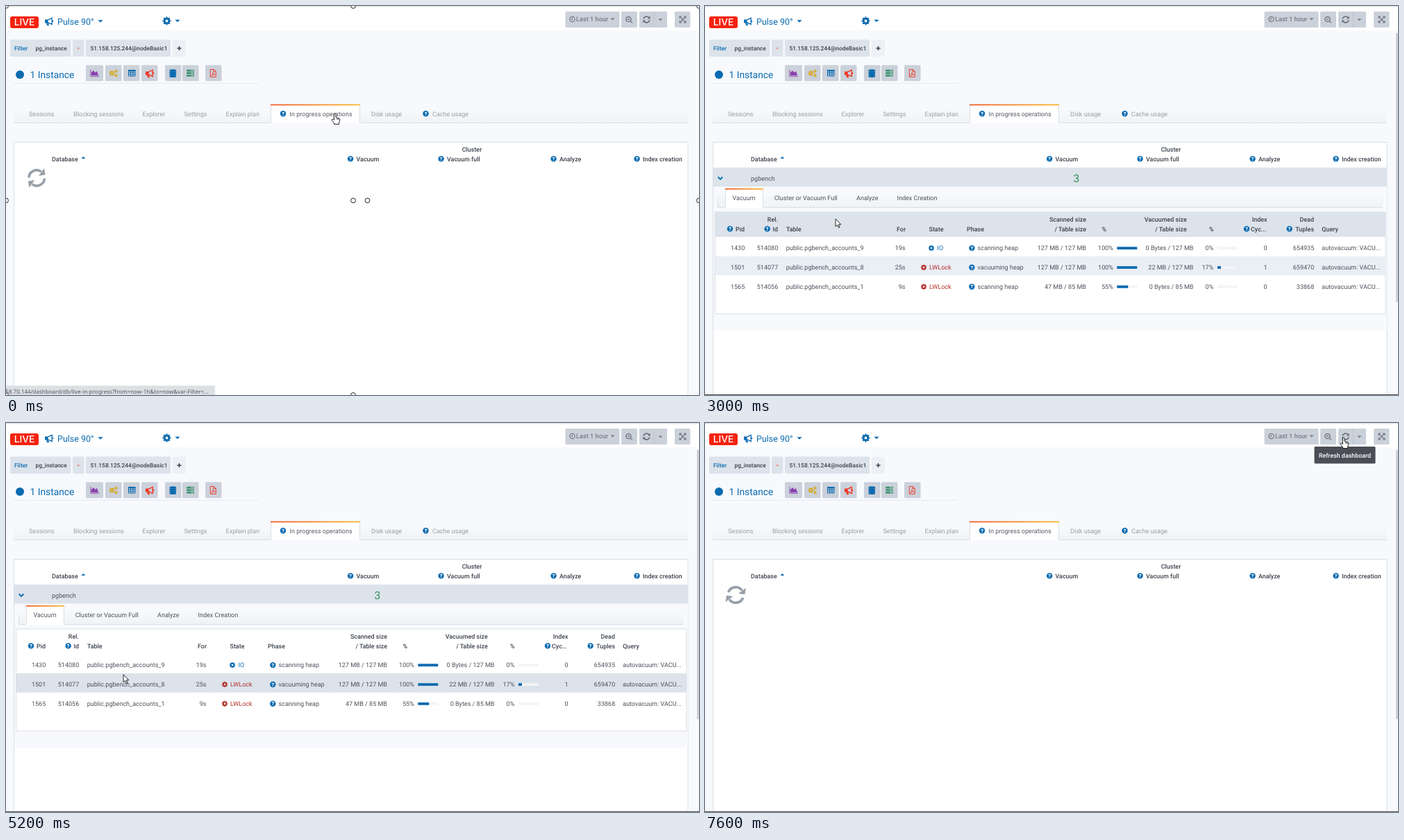
These frames come from a looping animation (998 px wide and 561 px high, 7800 ms). An HTML page:

```html
<!DOCTYPE html>
<html lang="en">
<head>
<meta charset="utf-8">
<title>In progress operations</title>
<style>
html, body { margin: 0; width: 100%; height: 100%; overflow: hidden; background: #f7f9fc; }
svg { display: block; width: 998px; height: 561px; text-rendering: geometricPrecision; }
text { font-family: Roboto, Arial, sans-serif; white-space: pre; }
</style>
</head>
<body>
<svg id="stage" viewBox="0 0 998 561" xmlns="http://www.w3.org/2000/svg"></svg>
<script>
const BLUE = '#0b6bb0', INK = '#3b424c', BODY = '#4b525c', MUTED = '#9a9da3', RED = '#b5312c';
const HOVER = '#dce3eb', LINE = '#dadee4';
const STEP = 200, LOOP = 7800;

// y is the vertical middle of the capitals
const text = (x, y, s, { size = 9.05, fill = BODY, weight = 400, anchor = 'start', font = '' } = {}) =>
  `<text x="${x}" y="${y + size * .356}" font-size="${size}" fill="${fill}" font-weight="${weight}" text-anchor="${anchor}"${font && ` style="font-family:${font}"`}>${s.replace(/&/g, '&amp;')}</text>`;
const rect = (x, y, w, h, fill, extra = '') => `<rect x="${x}" y="${y}" width="${w}" height="${h}" fill="${fill}" ${extra}/>`;
const path = (d, fill, extra = '') => `<path d="${d}" fill="${fill}" ${extra}/>`;
const line = (d, stroke, w = 1, extra = '') => path(d, 'none', `stroke="${stroke}" stroke-width="${w}" ${extra}`);
const at = (x, y, body, scale = 1) => `<g transform="translate(${x} ${y}) scale(${scale})">${body}</g>`;
const group = (id, body) => `<g id="${id}">${body}</g>`;
const head = (x, y, s, anchor) => text(x, y, s, { size: 8.95, fill: INK, weight: 500, anchor });
const right = (x, y, s) => text(x, y, s, { anchor: 'end' });

const help = (x, y) => `<circle cx="${x}" cy="${y}" r="4.2" fill="${BLUE}"/>` +
  text(x, y, '?', { size: 7.2, fill: '#fff', weight: 900, anchor: 'middle' });
const gear = (x, y, r, fill) =>
  `<g fill="none" stroke="${fill}"><circle cx="${x}" cy="${y}" r="${r * .56}" stroke-width="${r * .48}"/>
  <circle cx="${x}" cy="${y}" r="${r * .86}" stroke-width="${r * .3}" pathLength="16" stroke-dasharray="1 1" stroke-dashoffset=".5"/></g>`;
const caret = (x, y, fill, r = 3.6) => path(`M${x - r} ${y - r / 2}h${2 * r}l${-r} ${r}z`, fill);
const bullhorn = (x, y, fill) => at(x, y,
  line('M-5.2-1.8H-1.5L4.2-4.6V4.4L-1.5 1.8H-5.2zM-3.5 2l1.2 3.6h1.6L-1.8 2M5.5-1.2V1', fill, 1.3) +
  path('M-5.5-2H-1.5V2H-5.5z', fill));
const arrows = (fill, w = 3.6) => {
  const half = line('M-11-2.5A11.2 11.2 0 0 1 8-7.8', fill, w) + path('M13-12V-2.5H3.5z', fill);
  return half + `<g transform="rotate(180)">${half}</g>`;
};
const button = (x, y, w, h = 23) => rect(x, y, w, h, '#cbd1da', 'rx="1.5"');
const tag = (x, w) => rect(x, 48.5, w, 24.5, '#dce3eb', 'rx="1.5"');

function header() {
  const grey = '#737b87', bold = { size: 8.4, fill: INK, weight: 500 };
  let s = rect(0, 0, 998, 35, '#fff') + rect(0, 0, 998, 1.5, '#e4e6e8');
  s += rect(6, 15, 41, 17, '#f4230f', 'rx="3"') +
    text(26.5, 23.3, 'LIVE', { size: 13.8, fill: '#fff', weight: 500, anchor: 'middle', font: 'Inter, sans-serif' });
  s += bullhorn(62, 22, BLUE) + text(74, 22.2, 'Pulse 90°', { size: 12.5, fill: BLUE }) + caret(136, 22, BLUE);
  s += gear(231.5, 21.5, 6, BLUE) + caret(247, 21.5, BLUE);

  s += button(805.5, 8, 78) + button(886, 8, 23) + button(912, 8, 40) + button(963, 8, 22.5);
  s += `<circle cx="815.5" cy="19" r="3.6" fill="none" stroke="${grey}" stroke-width="1.2"/>` + line('M815.5 17v2.3h-2', grey) +
    text(821, 19.2, 'Last 1 hour', { size: 9.2, fill: grey, weight: 500 }) + caret(873.5, 19, grey, 3);
  s += `<circle cx="896.5" cy="19" r="3.6" fill="none" stroke="${grey}" stroke-width="1.5"/>` +
    line('M899 21.5l3 3M894.8 19h3.4', grey, 1.3);
  s += at(922.5, 19.5, arrows('#5f6874', 4), .4) + line('M933 8v23', '#bcc3cd') + caret(942.5, 20, grey, 3);
  s += line('M970.5 15.5l8 8M978.5 15.5l-8 8', grey, 1.3) +
    path('M969.5 14.5h4l-4 4zM979.5 14.5v4l-4-4zM969.5 24.5v-4l4 4zM979.5 24.5h-4l4-4z', grey);

  s += tag(6, 87.5) + tag(96, 16.5) + tag(115, 122) +
    rect(240, 49, 19, 24, '#edf0f4', 'rx="1.5"');
  s += text(12, 61, 'Filter', { ...bold, fill: BLUE }) + text(42.5, 61, 'pg_instance', bold) +
    text(104.3, 61, '=', { size: 6, fill: '#f06050', weight: 700, anchor: 'middle' }) +
    text(121.5, 61, '51.158.125.244@nodeBasic1', bold) + line('M246.5 61h6M249.5 58v6', INK, 1.6);

  s += `<circle cx="20" cy="99" r="6" fill="${BLUE}"/>` + text(34.5, 99.3, '1 Instance', { size: 13.8, fill: BLUE });
  s += line('M11 111.5H364', '#e6eaef');
  return s;
}

function toolbar() {
  let s = [115, 143, 169, 195, 229, 254, 287].map((x, i) => button(x, 85.3, i ? 23.5 : 25)).join('');
  s += path('M123 100v-4l3-3 2.5 3 2.5-2 2 6z', '#8a3fae') + line('M122 92v9.3h12', '#8a3fae');
  s += gear(152.5, 97, 3.8, '#d9a514') + gear(158.5, 93.8, 2.4, '#d9a514') + gear(158.5, 100.2, 2.4, '#d9a514');
  s += line('M176.5 92.5h9.5v8.5h-9.5zM176.5 95.5h9.5M176.5 98.2h9.5M179.7 93v8M182.9 93v8', BLUE) + rect(176, 92, 10.5, 2, BLUE);
  s += bullhorn(207, 97, '#f0301c');
  for (let i = 0; i < 4; i++)
    s += `<ellipse cx="240.3" cy="${92.8 + i * 2.9}" rx="4.8" ry="1.5" fill="${BLUE}"/>`;
  s += rect(235.5, 93, 9.6, 8.2, BLUE, 'opacity=".65"');
  for (let i = 0; i < 3; i++)
    s += rect(260.2, 91.8 + i * 3.6, 10.6, 2.7, '#3c9070') + rect(266.5, 92.7 + i * 3.6, 3, .9, '#dceae4');
  s += line('M294.3 91.5h5l3 3v7.8h-8zM299 91.7v3h3', '#ee3a2e') + line('M296 100.5q2-2 2.2-5q.4 4 3 3.4q-2.6-.6-5.2 1.6', '#ee3a2e', .8);
  return s;
}

function panel() {
  let s = rect(11, 141, 971, 27.5, 'url(#strip)') + line('M11 168.5H982', LINE);
  s += rect(381, 142, 129, 27, '#fff') + line('M381.5 143V168.5M509.5 143V168.5', LINE) + rect(381, 141.6, 129, 1.8, 'url(#accent)');
  const tabs = [[33, 'Sessions'], [97, 'Blocking sessions'], [196.5, 'Explorer'], [256.5, 'Settings'],
    [316.5, 'Explain plan'], [526, 'Disk usage'], [614, 'Cache usage']];
  for (const [x, name] of tabs) s += text(x, 155.3, name, { fill: MUTED });
  s += text(408.5, 155.3, 'In progress operations', { fill: '#555b64' }) + help(399, 155.3) + help(604.5, 155.3);
  s += rect(11.5, 196.5, 970.5, 380, '#fff', `stroke="${LINE}"`);
  s += group('dbHover', rect(12, 233, 970, 27.5, HOVER));
  s += head(66, 220.4, 'Database') + path('M108.5 220h5.8l-2.9-3z', BLUE) + head(671, 206.8, 'Cluster', 'middle');
  for (const [x, name] of [[504.5, 'Vacuum'], [635, 'Vacuum full'], [797, 'Analyze'], [917, 'Index creation']])
    s += help(x - 8.4, 220.4) + head(x, 220.4, name);
  return s;
}

function row(y, [pid, rel, table, age, state, phase, scanned, done, vacuumed, cleaned, cycles, dead]) {
  const io = state === 'IO', fill = io ? BLUE : RED;
  const bar = (x, pct) => rect(x, y - 1.8, 29, 3.8, '#f3f4f6') + rect(x, y - 1.8, 29 * pct / 100, 3.8, BLUE);
  return right(57.3, y, pid) + right(105.3, y, rel) + text(116.7, y, 'public.pgbench_accounts_' + table) +
    right(288.5, y, age) + gear(io ? 326 : 315, y, 4.2, fill) + text(io ? 334.5 : 323, y, state, { fill }) +
    help(384.3, y) + text(392.5, y, phase) + right(549, y, scanned) + right(588, y, done + '%') + bar(593.3, done) +
    right(703.5, y, vacuumed) + right(732.3, y, cleaned + '%') + bar(738, cleaned) +
    right(809.7, y, cycles) + right(877.3, y, dead) + text(888.3, y, 'autovacuum: VACU...');
}

function details() {
  let s = line('M18.7 246.5l3.3 3.3 3.3-3.3', BLUE, 1.9) + text(66, 248.3, 'pgbench') +
    text(535, 248.6, '3', { size: 15.6, fill: '#2f8f5b', anchor: 'middle' });
  s += rect(12, 261, 970, 207, '#f7f9fc') + rect(18, 263, 958, 27, 'url(#strip)') + line('M18 290.5H976M18.5 278V290', LINE);
  s += rect(29, 263.5, 55, 28, '#fff') + line('M29.5 264V290M83.5 264V290', LINE) + rect(29, 263, 55, 1.7, 'url(#accent)');
  for (const [x, name] of [[39.5, 'Vacuum'], [99.7, 'Cluster or Vacuum Full'], [218, 'Analyze'], [276.5, 'Index Creation']])
    s += text(x, 276.8, name);
  s += rect(14.5, 297, 965.5, 147, '#fff', `stroke="${LINE}"`) + rect(15, 361, 965, 27.3, '#eaeef5');
  s += rect(15, 0, 965, 27, HOVER, 'id="rowHover"');

  for (const [x, a, b] of [[105, 'Rel.', 'Id'], [549, 'Scanned size', '/ Table size'],
    [693.7, 'Vacuumed size', '/ Table size'], [809.5, 'Index', ''], [877, 'Dead', 'Tuples']])
    s += head(x, 307.5, a, 'end') + head(x, 321.4, b, 'end');
  for (const [x, name] of [[44, 'Pid'], [117, 'Table'], [276, 'For'], [322.5, 'State'], [377, 'Phase'],
    [571.5, '%'], [726, '%'], [786, 'Cyc...'], [888.3, 'Query']])
    s += head(x, 321.4, name);
  for (const x of [36, 89.7, 780, 841.7]) s += help(x, 321.4);

  s += row(349.1, ['1430', '514080', 9, '19s', 'IO', 'scanning heap', '127 MB / 127 MB', 100, '0 Bytes / 127 MB', 0, '0', '654935']);
  s += row(377, ['1501', '514077', 8, '25s', 'LWLock', 'vacuuming heap', '127 MB / 127 MB', 100, '22 MB / 127 MB', 17, '1', '659470']);
  s += row(404.8, ['1565', '514056', 1, '9s', 'LWLock', 'scanning heap', '47 MB / 85 MB', 55, '0 Bytes / 85 MB', 0, '0', '33868']);
  return s;
}

function overlays() {
  const black = 'stroke="#111" stroke-width=".9" stroke-linejoin="round"';
  const spots = [[0, 0], [500, 0], [998, 0], [0, 280.5], [500, 280.5], [520.5, 280.5], [998, 280.5], [0, 561], [500, 561]];
  return group('status', path('M0 547.5H299a2 2 0 0 1 2 2V561H0z', '#dcdfe3') +
      text(-.7, 556, '58.70.144/dashboard/db/live-in-progress?from=now-1h&to=now&var-Filter=...',
        { size: 8, fill: '#50555c', font: "'Noto Sans', sans-serif" })) +
    group('frame', rect(995, 39, 3, 388, '#cdd0d4') + rect(0, 560, 998, 1, '#4a4d50')) +
    group('handles', spots.map(([x, y]) => `<circle cx="${x}" cy="${y}" r="3.4" fill="#fff" stroke="#222"/>`).join('')) +
    group('tip', rect(877.5, 34, 88, 24.5, '#4b4e57', 'rx="1.5"') +
      text(921.5, 46.4, 'Refresh dashboard', { size: 8.9, fill: '#fff', weight: 500, anchor: 'middle' })) +
    group('cursor',
      group('arrow', path('M0 0V11L2.6 8.7 4.3 12.7 6 12 4.4 8.1H7.8z', '#fff', black)) +
      group('hand', path('M-1.6 1Q-1.6-.6-.3-.6T1 1V5.2L2.8 5.5 6 6.6Q7 7 6.8 9L5.6 12.6V15H-1.5V13.4L-4.6 9.4Q-5.2 8 -4 7.6T-1.6 9z', '#fff', black) +
        line('M2.9 6v2.4M4.9 6.6v2.2', '#111', .8)) +
      group('beam', line('M-2.2-5.2Q0-5.2 0-4Q0-5.2 2.2-5.2M0-4.5V4.5M-2.2 5.2Q0 5.2 0 4Q0 5.2 2.2 5.2', '#222', 1)));
}

const stage = document.getElementById('stage');
stage.innerHTML = `<defs>
  <linearGradient id="accent"><stop stop-color="#f05a28"/><stop offset="1" stop-color="#f9b72d"/></linearGradient>
  <linearGradient id="strip" x2="0" y2="1"><stop offset=".3" stop-color="#f7f9fc"/><stop offset="1" stop-color="#f1f2f4"/></linearGradient>
  </defs>` + rect(0, 0, 998, 561, '#f7f9fc') + header() + toolbar() + panel() +
  group('spinner', arrows('#979fa9')) + group('details', details()) + overlays();

const el = {};
for (const node of stage.querySelectorAll('g[id], rect[id]')) el[node.id] = node;
const show = (id, on) => { el[id].style.display = on ? '' : 'none'; };

// time, x, y of the pointer
const route = [[0, 474, 155.5], [1200, 474, 155.5], [1400, 451, 190.5], [3000, 188, 307], [4400, 180, 402.5],
  [5800, 162, 337], [6400, 848.5, 69.5], [7200, 920, 21.5], [LOOP, 920, 21.5]];
const bands = [[297, 333], [333, 361], [361, 388.5], [388.5, 416]];

function pointer(t) {
  const i = route.findIndex(p => p[0] > t);
  const [t0, x0, y0] = route[i - 1], [t1, x1, y1] = route[i];
  const u = (t - t0) / (t1 - t0), e = u * u * (3 - 2 * u);
  return [x0 + (x1 - x0) * e, y0 + (y1 - y0) * e];
}

function draw(time) {
  const t = Math.floor(time % LOOP / STEP) * STEP;
  const [x, y] = pointer(t);
  const loaded = t >= 800 && t < 7400;
  const hand = t < 1400 || t >= 7200;
  const beam = x > 116 && x < 229 && [349, 377, 405].some(m => Math.abs(y - m) < 7);
  const band = bands.find(([a, b]) => y >= a && y < b);

  show('spinner', !loaded);
  show('details', loaded);
  show('dbHover', loaded && y > 233 && y < 468);
  show('rowHover', band);
  if (band) {
    el.rowHover.setAttribute('y', band[0]);
    el.rowHover.setAttribute('height', band[1] - band[0]);
  }
  const angle = t < 800 ? t * .18 - 10 : (t - 7600) * .18 + 8;
  el.spinner.setAttribute('transform', `translate(44.2 248) rotate(${angle})`);
  show('status', t < 2600);
  el.status.style.opacity = t < 2400 ? 1 : .5;
  show('handles', t < STEP);
  show('frame', t >= STEP);
  show('tip', t >= 7200);
  show('hand', hand);
  show('beam', !hand && beam);
  show('arrow', !hand && !beam);
  el.cursor.setAttribute('transform', `translate(${x} ${y})`);
}

const start = performance.now();
function tick() {
  draw(performance.now() - start);
  requestAnimationFrame(tick);
}
tick();
</script>
</body>
</html>
```
